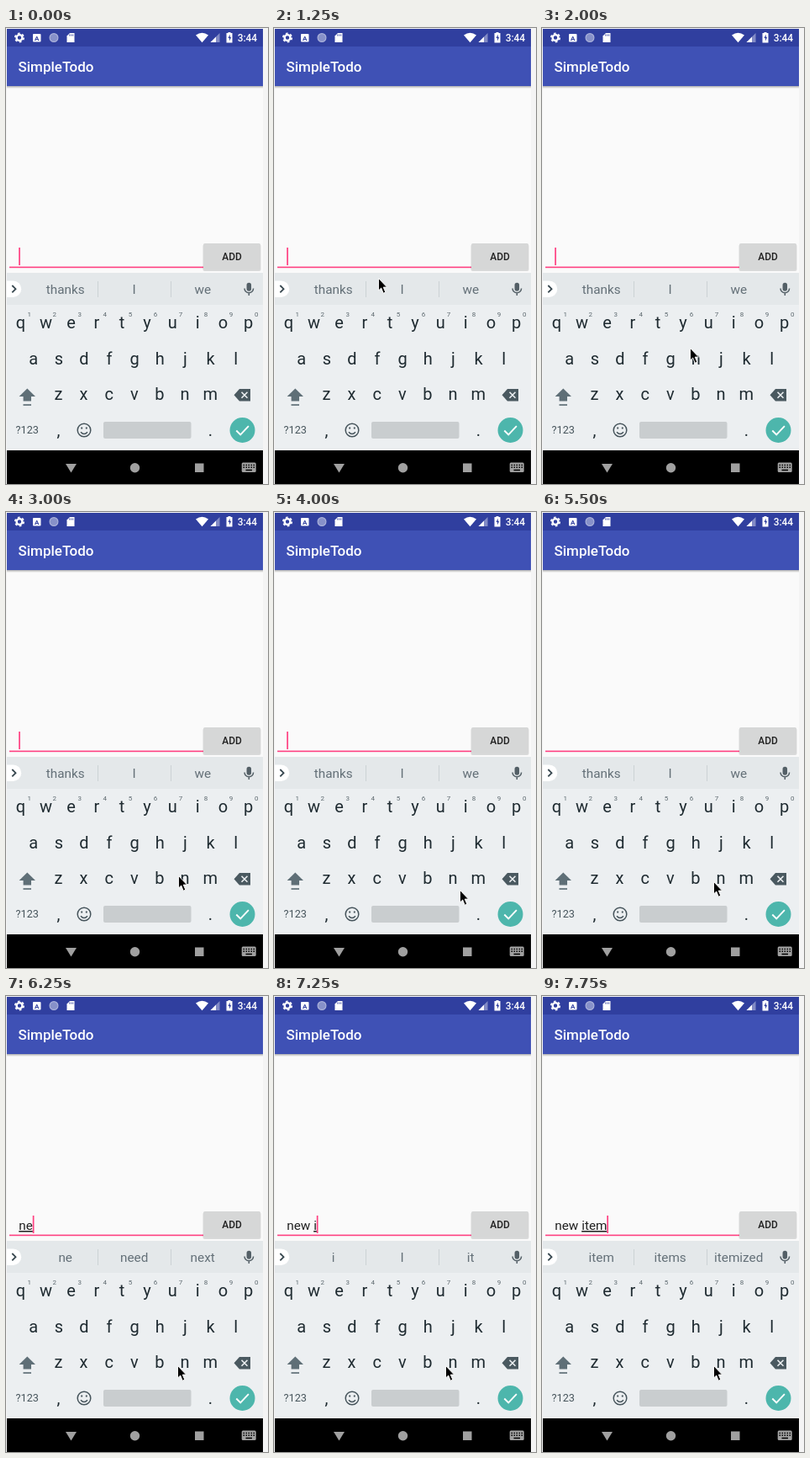
Animation of 312 by 542 pixels, one loop 8 s. Source, as an HTML page:

```html
<!DOCTYPE html>
<html lang="en">
<head>
<meta charset="utf-8">
<title>Todo entry</title>
<style>
html, body { margin: 0; width: 100%; height: 100%; overflow: hidden; background: #f4f4f4; }
svg { display: block; width: 312px; height: 542px; }
text { font-family: Roboto, "Open Sans", sans-serif; white-space: pre; }
.mid { text-anchor: middle; }
.medium { font-weight: 500; }
.key { font-size: 20px; fill: #1f2b31; }
.hint { font-size: 8px; fill: #5c686e; }
.word { font-size: 15.3px; fill: #647078; }
.entry { font-size: 15.3px; fill: #212121; }
.typing { text-decoration: underline; text-decoration-thickness: 1px; }
</style>
</head>
<body>
<svg viewBox="0 0 312 542">
  <defs>
    <linearGradient id="shade" x2="0" y2="1">
      <stop stop-color="#000" stop-opacity=".3"/>
      <stop offset="1" stop-color="#000" stop-opacity="0"/>
    </linearGradient>
  </defs>

  <!-- app -->
  <rect x="1" y="1" width="305" height="21" fill="#303f9f"/>
  <rect x="1" y="22" width="305" height="47" fill="#3f51b5"/>
  <rect x="1" y="69" width="305" height="222" fill="#fafafa"/>
  <rect x="1" y="69" width="305" height="3" fill="url(#shade)"/>
  <text class="medium" x="14.5" y="52" font-size="17" fill="#fff">SimpleTodo</text>

  <!-- status bar -->
  <g fill="#fff">
    <circle cx="16" cy="11.5" r="3.4" fill="none" stroke="#fff" stroke-width="2.4"/>
    <circle cx="16" cy="11.5" r="5.2" fill="none" stroke="#fff" stroke-width="1.7" stroke-dasharray="2.7 2.745"/>
    <rect x="32" y="7" width="9.5" height="9.5" rx="1"/>
    <text class="mid" x="36.8" y="14.6" font-size="8" font-weight="700" style="fill:#303f9f">A</text>
    <circle cx="57" cy="11.5" r="4.9" fill="#8791c9" stroke="#aab1da" stroke-width="1.2"/>
    <path d="M76 6h5.5v11h-9v-7.500z"/>
    <path d="M75.700 7.500v2M77.700 7.500v2M79.700 7.500v2" stroke="#303f9f" stroke-width=".9"/>
    <path d="M226 8.600Q233.500 3 241 8.600L233.500 17.300z"/>
    <path d="M254.500 6v11h-11z" opacity=".4"/>
    <path d="M250 10.500v6.500h-6.500z"/>
    <path d="M264.500 6V5h3v1h2v11.500h-7V6z"/>
    <path d="M266.700 7.500l-2.200 4.500h1.500v3.500l2.200-4.700h-1.500z" fill="#303f9f"/>
    <text class="medium" x="275.700" y="16" font-size="11.9">3:44</text>
  </g>

  <!-- entry row -->
  <rect x="4" y="283.600" width="231" height="1.600" fill="#ff4081"/>
  <rect x="234.500" y="257" width="69" height="32" rx="2" fill="#000" opacity=".13"/>
  <rect x="235" y="256" width="68" height="31.500" rx="1.700" fill="#d6d7d7"/>
  <text class="medium mid" x="269" y="276" font-size="11.9" fill="#212121">ADD</text>
  <text class="entry" x="15.3" y="278"><tspan id="done"></tspan><tspan id="typing" class="typing"></tspan></text>
  <rect id="caret" y="261" width="1.700" height="21" fill="#ff4081"/>

  <!-- keyboard -->
  <rect x="1" y="291" width="305" height="38" fill="#e4e8ea"/>
  <rect x="1" y="329" width="305" height="173" fill="#eceff1"/>
  <path d="M109.500 301v19M196.500 301v19" stroke="#ccd2d5"/>
  <path d="M1 300.500H8.500a9.700 9.700 0 0 1 0 19.400H1z" fill="#fff"/>
  <path d="M7.300 306l4.200 4.200-4.200 4.200" fill="none" stroke="#37474f" stroke-width="1.800"/>
  <g id="words"></g>
  <g fill="none" stroke="#546067" stroke-width="1.500">
    <rect x="287.300" y="303.500" width="4" height="8.500" rx="2" fill="#546067"/>
    <path d="M284 309.500a5.300 5.300 0 0 0 10.600 0M289.300 315v3"/>
  </g>
  <g id="keys"></g>
  <path d="M25.300 428.500l9.700 9.500h-5v5.500h-9.400V438h-5z" fill="#5f6f77"/>
  <path d="M20.500 448h9.500" stroke="#5f6f77" stroke-width="1.700"/>
  <path d="M278 429h13v14.500h-13l-6.500-7.250z" fill="#4a5960"/>
  <path d="M280.500 432.700l7 7m0-7l-7 7" stroke="#eceff1" stroke-width="1.600"/>
  <text class="mid" x="25.200" y="482.300" font-size="12.7" fill="#46545b">?123</text>
  <g fill="none" stroke="#46545b" stroke-width="1.500">
    <circle cx="93" cy="478" r="7.800"/>
    <path d="M89 480.300q4 4.500 8 0"/>
    <path d="M90.200 474.500v2M95.800 474.500v2" stroke-width="1.900"/>
  </g>
  <rect x="116" y="468" width="104.500" height="20" rx="2" fill="#c9cdcf"/>
  <circle cx="281.500" cy="478" r="15" fill="#4db6ac"/>
  <path d="M274.300 478.500l4.900 4.900 9.700-10.200" fill="none" stroke="#fff" stroke-width="1.900"/>

  <!-- navigation bar -->
  <rect x="1" y="502" width="305" height="40" fill="#000"/>
  <g fill="#a0a0a0">
    <path d="M71 518h13l-6.500 10.500z"/>
    <circle cx="153.500" cy="522.700" r="5.700"/>
    <rect x="225" y="517.500" width="10.500" height="10.500"/>
    <rect x="280.700" y="516.500" width="17" height="11.500" rx="1.500"/>
    <g stroke="#000" stroke-width="1.500">
      <path d="M282.500 519.500h13.500M282.500 522.300h13.500" stroke-dasharray="1.500 1.500"/>
      <path d="M285.500 525.500h7.500"/>
    </g>
  </g>

  <path id="mouse" d="M.5.500v14.500l3.200-3 2.500 6.200 2.600-1.100-2.600-6h4.300z" fill="#000" stroke="#fff" stroke-width=".9"/>
</svg>
<script>
const LOOP = 8000, TICK = 250;
const $ = id => document.getElementById(id);

function addText(parent, cls, x, y, label = "") {
  const el = document.createElementNS("http://www.w3.org/2000/svg", "text");
  el.setAttribute("class", cls);
  el.setAttribute("x", x);
  el.setAttribute("y", y);
  el.textContent = label;
  parent.append(el);
  return el;
}

const keys = $("keys"), PITCH = 30.13;
for (const [row, x, y] of [["qwertyuiop", 17.4, 357], ["asdfghjkl", 32.7, 399.5], ["zxcvbnm", 62.4, 442]])
  [...row].forEach((c, i) => addText(keys, "key mid", x + i * PITCH, y, c));
[..."1234567890"].forEach((c, i) => addText(keys, "hint mid", 27.7 + i * 30.05, 343, c));
addText(keys, "key mid", 62.5, 485, ",");
addText(keys, "key mid", 243.5, 485, ".");

const words = [70.7, 152.7, 234.2].map(x => addText($("words"), "word mid", x, 316));

// time, x, y of the pointer tip
const pointer = [
  [500, 178, 172], [750, 153, 218], [1000, 130, 264], [1250, 124, 297], [1500, 139, 316],
  [1750, 158, 345], [2000, 176, 380], [2250, 192, 410], [2500, 202, 427], [2750, 205, 432],
  [4000, 221, 449], [4250, 212, 424], [4500, 201, 397], [4750, 201, 414], [5000, 203, 432],
  [5250, 204, 439]
];

// time, finished text, underlined text, suggestions
const typed = [
  [0, "", "", "thanks I we"],
  [6000, "", "n", "n no not"],
  [6250, "", "ne", "ne need next"],
  [6750, "", "new", "new newer news"],
  [7250, "new ", "i", "i I it"],
  [7500, "new ", "ite", "ite item items"],
  [7750, "new ", "item", "item items itemized"]
];

const stepAt = (steps, t) => steps.findLast(s => s[0] <= t);

function draw(t) {
  const [since, done, typing, suggestions] = stepAt(typed, t);
  $("done").textContent = done;
  $("typing").textContent = typing;
  suggestions.split(" ").forEach((w, i) => words[i].textContent = w);

  const width = done || typing ? $("done").parentNode.getComputedTextLength() : 0;
  $("caret").setAttribute("x", 15.2 + width);
  $("caret").style.visibility = (t - since) % 1000 < 500 ? "visible" : "hidden";

  const spot = stepAt(pointer, t);
  $("mouse").style.visibility = spot ? "visible" : "hidden";
  if (spot) $("mouse").setAttribute("transform", `translate(${spot[1]} ${spot[2]})`);
}

function frame() {
  const t = performance.now() % LOOP;
  draw(Math.floor(t / TICK) * TICK);
  requestAnimationFrame(frame);
}
frame();
</script>
</body>
</html>
```
